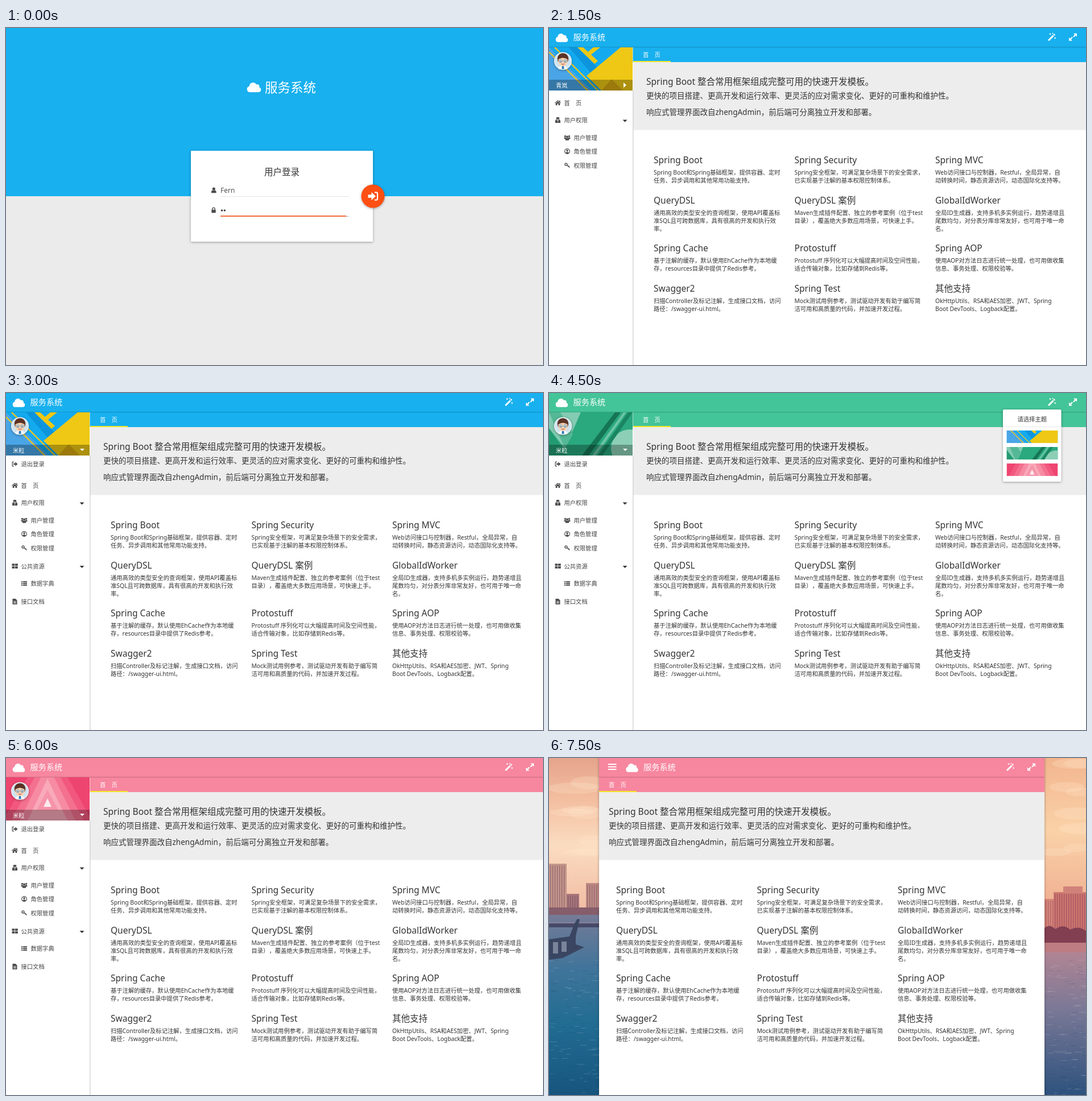
These frames come from a looping animation (944x593 px, 8 s). An HTML page:

```html
<!DOCTYPE html>
<html lang="zh-CN">
<head>
<meta charset="utf-8">
<title>服务系统</title>
<style>
html, body { margin: 0; width: 100%; height: 100%; overflow: hidden; background: #fff; }
#stage { display: block; width: 100%; height: 100%; }
text { font-family: "Noto Sans", "Noto Sans CJK SC", "Noto Sans CJK", sans-serif; text-spacing-trim: space-all; }
.shadow { filter: drop-shadow(0 1px 2px rgba(0,0,0,.35)); }
</style>
</head>
<body>
<svg id="stage" viewBox="0 0 944 593"></svg>
<script>
const stage = document.getElementById('stage');

const rect = (x, y, w, h, fill, more = '') =>
  `<rect x="${x}" y="${y}" width="${w}" height="${h}" fill="${fill}" ${more}/>`;
const circle = (x, y, r, fill, more = '') => `<circle cx="${x}" cy="${y}" r="${r}" fill="${fill}" ${more}/>`;
const path = (d, fill, more = '') => `<path d="${d}" fill="${fill}" ${more}/>`;
const stroke = (d, color, width) => path(d, 'none', `stroke="${color}" stroke-width="${width}"`);
const text = (x, y, size, str, fill = '#333', more = '') =>
  `<text x="${x}" y="${y}" font-size="${size}" fill="${fill}" ${more}>${str}</text>`;
const move = (x, y, body, scale = 1) => `<g transform="translate(${x} ${y}) scale(${scale})">${body}</g>`;

// Icons are centred on 0,0 and about 10px wide, except the cloud (25 x 18, from its corner).
const INK = '#4d4d4d';
const cloud = path('M5.5 18A5.4 5.4 0 0 1 3.7 7.4A6.6 6.6 0 0 1 16 4.3A3.9 3.9 0 0 1 21.2 9.3A4.5 4.5 0 0 1 20 18Z', '#fff');
const icons = {
  home: path('M-5.5 .3L0-4.6L2.6-2.3V-4H4V-1L5.5 .3L4.7 1L0-3L-4.7 1ZM-3.8 1L0-2.2L3.8 1V4.5H1V1.6H-1V4.5H-3.8Z', INK),
  user: circle(0, -2.3, 2.6, INK) + path('M-4.3 4.8V2.6Q-4.3 .2-2 .2H2Q4.3 .2 4.3 2.6V4.8Z', INK),
  lock: rect(-3.7, -.7, 7.4, 5.4, INK, 'rx=".7"') + stroke('M-2.2 0V-2.2A2.2 2.2 0 0 1 2.2-2.2V0', INK, 1.4),
  keeper: path('M-3-1.6L-2.3-5H2.3L3-1.6ZM-4.5 5V1.6Q-4.5-.8-2.5-.8H2.5Q4.5-.8 4.5 1.6V5Z', INK) +
    rect(-1.6, 0, 3.2, 1, '#fff') + rect(-.4, 2, .8, 2, '#fff'),
  group: [-3.5, 3.5].map(x => circle(x, -2.6, 1.7, INK) + rect(x - 2, -.6, 4, 2.8, INK, 'rx="1"')).join('') +
    circle(0, -1.5, 2.3, INK, 'stroke="#fff" stroke-width=".5"') + rect(-3.2, .8, 6.4, 4, INK, 'rx="1.4"'),
  face: circle(0, 0, 4.4, 'none', `stroke="${INK}" stroke-width="1.2"`) + circle(0, -1.2, 1.7, INK) +
    path('M-3.2 2.8Q0-.6 3.2 2.8Q0 5.6-3.2 2.8Z', INK),
  key: circle(-2, -1.6, 2, 'none', `stroke="${INK}" stroke-width="1.4"`) + stroke('M-.5-.3L4.4 4M2.3 2.2L3.4 .9', INK, 1.5),
  exit: stroke('M-1.5-3.6H-4.3V3.6H-1.5', INK, 1.2) + path('M-2.5-1.3H.7V-3.8L5 0L.7 3.8V1.3H-2.5Z', INK),
  grid: [[-5, -4.2], [.5, -4.2], [-5, .5], [.5, .5]].map(([x, y]) => rect(x, y, 4.8, 3.8, INK)).join(''),
  list: [-3.8, -.9, 2].map(y => rect(-5, y, 2, 2, INK) + rect(-2.2, y, 7.2, 2, INK)).join(''),
  doc: path('M-4-5H1.2L4-2.2V5H-4Z', INK) + stroke('M-2.2-.2H2.2M-2.2 1.4H2.2M-2.2 3H2.2', '#fff', .8),
};
const downCaret = (x, y, fill) => path(`M${x - 4} ${y - 2}h8l-4 4Z`, fill);
const wand = stroke('M-6 6L2.6-2.6', '#fff', 3) + stroke('M3.4-3.4L5-5', '#fff', 3) +
  stroke('M-3-7v3M-4.5-5.5h3M1.5-7.4v2M.5-6.4h2M5.6 .2v3M4.1 1.7h3', '#fff', 1);
const expand = path('M1-6.5H7V-.5L4.8-2.7L1.7 .4L.2-1.1L3.2-4.2ZM-1 6.5H-7V.5L-4.8 2.7L-1.7-.4L-.2 1.1L-3.2 4.2Z', '#fff');

const themes = {
  blue: {
    color: '#18b0ee',
    art: rect(0, 34, 147, 76, '#14aaf0') +
      path('M0 34L75 110H0Z', '#4aa5e6') + path('M35 34H50L100 84L88 96Z', '#0c95dc') +
      path('M126 34H147V110H92L66 84Z', '#eec814') + path('M92 110L110 90L130 110Z', '#d6a80e') +
      stroke('M0 42L70 112M8 32L88 112', '#e8c528', 2.4) +
      path('M50 34H60L86 58L80 63ZM78 34H90L70 50L65 45Z', '#eec814'),
  },
  green: {
    color: '#44c499',
    art: rect(0, 34, 147, 76, '#2aa87e') +
      path('M0 34H56L28 98L0 62Z', '#83cbb2') + path('M0 34H20L42 72L28 98Z', '#54b896') +
      path('M0 62L32 110H0Z', '#239b72') +
      circle(142, 97, 33, '#8ccfb6') +
      path('M116 34H126L70 110H58Z', '#157555') + path('M131 34H136L82 110H76Z', '#6cc5a6') +
      path('M139 34H147L94 110H86Z', '#1a8562'),
  },
  pink: {
    color: '#f7869f',
    art: rect(0, 34, 147, 76, '#ee4570') +
      [[78, '#f2587f', -28], [64, '#f4708f', -8], [49, '#f68ba3', 10], [35, '#f9a9b9', 36]].map(([half, fill, top]) =>
        path(`M73 ${top}L${73 + half} 110H${73 - half}Z`, fill)).join('') +
      path('M73 56L92 92H54Z', '#f694aa') + path('M73 71L80 86H66Z', '#fdeaee'),
  },
};
const banner = (name, x, y, w, h) => `<svg x="${x}" y="${y}" width="${w}" height="${h}"
  viewBox="0 34 147 76" preserveAspectRatio="xMidYMid slice">${themes[name].art}</svg>`;

const avatar = circle(0, 0, 15.5, '#f3f6f8') + circle(0, 0, 14.3, '#cfe3ef') +
  path('M-8 14Q-7 8 0 8Q7 8 8 14Q0 16-8 14Z', '#f4f7fa') + path('M-1.5 8H1.5L2 14H-2Z', '#2878b8') +
  circle(0, -4, 9.8, '#5b3326') + path('M-8-3Q0-8 8-3V3Q6 9 0 9Q-6 9-8 3Z', '#fbd3b0') +
  [-3.8, 3.8].map(x => circle(x, .2, 2.6, '#fff', 'stroke="#5a87a0" stroke-width="1"') + circle(x, .4, 1, '#333')).join('') +
  stroke('M-2.5 5Q0 7 2.5 5', '#b5443c', 1.2);

const features = [
  ['Spring Boot', 'Spring Boot和Spring基础框架，提供容器、定时', '任务、异步调用和其他常用功能支持。'],
  ['Spring Security', 'Spring安全框架，可满足复杂场景下的安全需求，', '已实现基于注解的基本权限控制体系。'],
  ['Spring MVC', 'Web访问接口与控制器，Restful，全局异常，自', '动转换时间，静态资源访问，动态国际化支持等。'],
  ['QueryDSL', '通用高效的类型安全的查询框架，使用API覆盖标', '准SQL且可跨数据库，具有很高的开发和执行效', '率。'],
  ['QueryDSL 案例', 'Maven生成插件配置、独立的参考案例（位于test', '目录），覆盖绝大多数应用场景，可快速上手。'],
  ['GlobalIdWorker', '全局ID生成器，支持多机多实例运行，趋势递增且', '尾数均匀，对分表分库非常友好，也可用于唯一命', '名。'],
  ['Spring Cache', '基于注解的缓存，默认使用EhCache作为本地缓', '存，resources目录中提供了Redis参考。'],
  ['Protostuff', 'Protostuff 序列化可以大幅提高时间及空间性能，', '适合传输对象，比如存储到Redis等。'],
  ['Spring AOP', '使用AOP对方法日志进行统一处理，也可用做收集', '信息、事务处理、权限校验等。'],
  ['Swagger2', '扫描Controller及标记注解，生成接口文档，访问', '路径：/swagger-ui.html。'],
  ['Spring Test', 'Mock测试用例参考，测试驱动开发有助于编写简', '洁可用和高质量的代码，并加速开发过程。'],
  ['其他支持', 'OkHttpUtils、RSA和AES加密、JWT、Spring', 'Boot DevTools、Logback配置。'],
];
const rowBaselines = [238, 308.5, 393, 463.5];

const content = text(171, 100, 15.5, 'Spring Boot 整合常用框架组成完整可用的快速开发模板。') +
  text(171, 124, 13.5, '更快的项目搭建、更高开发和运行效率、更灵活的应对需求变化、更好的可重构和维护性。') +
  text(171, 152.5, 13.5, '响应式管理界面改自zhengAdmin，前后端可分离独立开发和部署。') +
  features.map(([title, ...lines], i) => {
    const x = 184 + (i % 3) * 247.5, y = rowBaselines[Math.floor(i / 3)];
    return text(x, y, 15.5, title) +
      lines.map((line, n) => text(x, y + 20 + n * 14.3, 10.3, line)).join('');
  }).join('');

// [icon, label, centre y, nested, expandable]
const userMenu = [
  ['home', '首　页', 131.5], ['keeper', '用户权限', 162, 0, 1],
  ['group', '用户管理', 193, 1], ['face', '角色管理', 217, 1], ['key', '权限管理', 241.5, 1],
];
const fullMenu = [
  ['exit', '退出登录', 125], ...userMenu.map(([icon, label, y, ...rest]) => [icon, label, y + 31, ...rest]),
  ['grid', '公共资源', 304.5, 0, 1], ['list', '数据字典', 335, 1], ['doc', '接口文档', 367],
];
const menuItem = ([icon, label, y, nested, expandable]) =>
  move(nested ? 32 : 15.5, y, icons[icon]) + text(nested ? 43.5 : 26.5, y + 4, 10.3, label, '#444') +
  (expandable ? downCaret(133.5, y + 1.5, '#333') : '');

function sidebar(theme, user, opened) {
  return rect(0, 34, 147.5, 559, '#fff') + rect(147, 110, 1.5, 483, '#d6d6d6') +
    banner(theme, 0, 34, 147, 76) + rect(0, 91, 147, 19, 'rgba(0,0,0,.28)') +
    `<g class="shadow">${move(24.5, 58, avatar)}</g>` + text(12, 104.5, 10.3, user, '#fff') +
    (opened ? downCaret(134, 100, '#fff') : path('M131 96L136 100.5L131 105Z', '#fff')) +
    (opened ? fullMenu : userMenu).map(menuItem).join('');
}

function page(theme, left, right, shifts) {
  const { color } = themes[theme];
  return rect(left, 0, right - left, 593, '#fff') + rect(left, 0, right - left, 60, color) +
    rect(left, 33, right - left, 1, 'rgba(0,0,0,.16)') + rect(left, 34, right - left, 1, 'rgba(0,0,0,.05)') +
    move(12 + shifts.title, 9, cloud, .88) + text(42.5 + shifts.title, 21, 14.2, '服务系统', '#fff') +
    move(884 + shifts.tools, 16, wand) + move(921 + shifts.tools, 16, expand) +
    text(165 + shifts.tab, 51, 10.3, '首　页', '#fff') + rect(148 + shifts.tab, 58, 66, 2, '#f3e722') +
    rect(148 + shifts.tab, 60, right - 148 - shifts.tab, 119.5, '#ededed') + move(shifts.content, 0, content);
}

const dashboard = (theme, user, opened) =>
  page(theme, 0, 944, { title: 0, tools: 0, tab: 0, content: 0 }) + sidebar(theme, user, opened);

const themePicker = rect(798, 29, 102.5, 127, '#fff', 'rx="2" class="shadow"') +
  text(823.5, 49.5, 10.3, '请选择主题') + rect(798, 59, 102.5, 1, '#e8e8e8') +
  Object.keys(themes).map((name, i) => banner(name, 804.5, 66 + i * 29, 90, 22)).join('');

const login = rect(0, 0, 944, 296, '#18b0ee') + rect(0, 296, 944, 297, '#ebebeb') +
  move(424, 95, cloud) + text(455, 113, 22.5, '服务系统', '#fff') +
  rect(325, 216, 320, 160, '#fff', 'rx="1" class="shadow"') +
  text(485, 259, 15.5, '用户登录', '#333', 'text-anchor="middle"') +
  move(365.3, 285.5, icons.user) + move(365, 320.5, icons.lock) +
  text(377, 289.5, 12, 'Fern', '#555') + rect(377, 296, 226, 1, '#e4e4e4') +
  circle(379.5, 321, 1.8, '#444') + circle(384.3, 321, 1.8, '#444') +
  rect(377, 331, 226, 1, '#bbb') + rect(377, 330, 221, 2, '#f26a3d') +
  circle(645, 296, 20.5, '#ff4f12', 'class="shadow"') +
  move(645.5, 296, path('M-9-2.7H-3V-7.2L4.5 0L-3 7.2V2.7H-9Z', '#fff') +
    stroke('M2.5-6.6H5.5Q7.5-6.6 7.5-4.6V4.6Q7.5 6.6 5.5 6.6H2.5', '#fff', 2.2));

const gradient = (id, stops) => `<linearGradient id="${id}" x2="0" y2="1">` +
  stops.map(([at, color]) => `<stop offset="${at}" stop-color="${color}"/>`).join('') + '</linearGradient>';

function harbour() {
  let seed = 7;
  const random = () => (seed = seed * 16807 % 2147483647) / 2147483647;
  const windows = (x, y, w, h, fill) => Array.from({ length: Math.floor(w / 4) }, (_, i) =>
    rect(x + 2 + i * 4, y + 3, 1.3, h - 3, fill)).join('');
  const building = (x, y, w, h, fill, shade) => rect(x, y, w, h, fill) + windows(x, y, w, h, shade);
  const cloudBand = (x, y) => `<ellipse cx="${x}" cy="${y}" rx="${20 + random() * 30}" ry="${5 + random() * 9}"
    fill="#ffe5cb" opacity=".25"/>`;
  const ripple = () => {
    const x = random() < .5 ? random() * 88 : 865 + random() * 79, y = 355 + random() * 238;
    return rect(x, y, 4 + random() * 10, 1, random() < .5 ? '#fff' : '#123a63', 'opacity=".16"');
  };
  return gradient('skyL', [[0, '#e5a48c'], [.25, '#f3bd9f'], [.55, '#fbdcc0'], [1, '#f0b9a0']]) +
    gradient('skyR', [[0, '#f2b58e'], [.4, '#fad2a8'], [1, '#eba088']]) +
    gradient('seaL', [[0, '#757b97'], [.3, '#40749a'], [.6, '#226c92'], [1, '#17557e']]) +
    gradient('seaR', [[0, '#b08594'], [.4, '#7a7896'], [1, '#2d527d']]) +
    rect(0, 0, 88, 280, 'url(#skyL)') + rect(871, 0, 73, 320, 'url(#skyR)') +
    Array.from({ length: 16 }, (_, i) => cloudBand(i % 2 ? 20 + random() * 60 : 890 + random() * 50, random() * 180)).join('') +
    building(0, 186, 31, 90, '#c5968a', '#946970') + building(31, 239, 22, 37, '#a9767a', '#80596a') +
    building(65, 220, 23, 56, '#bf8b84', '#946970') + rect(0, 263, 88, 14, '#865d6b') +
    rect(0, 276, 88, 317, 'url(#seaL)') + rect(0, 289, 88, 9, '#454a68') + rect(0, 289, 88, 2, '#8a809a') +
    path('M0 319L36 314L45 291L50 283L54 284L47 313V328L62 333L24 352L0 355Z', '#3a4561') +
    rect(7, 324, 9, 20, '#79839a') + rect(22, 323, 9, 18, '#79839a') +
    building(871, 248, 16, 60, '#d58678', '#b4646c') + building(887, 236, 57, 72, '#cb7770', '#a9535f') +
    rect(904, 226, 34, 12, '#d0827a') +
    path('M871 299Q880 291 890 301Q905 291 916 302Q930 294 944 304V328H871Z', '#823f52') +
    rect(871, 325, 73, 20, '#bd7d82') + rect(871, 342, 73, 251, 'url(#seaR)') +
    Array.from({ length: 240 }, ripple).join('');
}

const collapsed = harbour() +
  rect(88, -5, 783, 603, '#fff', 'class="shadow"') +
  page('pink', 88, 871, { title: 123.5, tools: -73, tab: -60, content: -66 }) +
  stroke('M104 11H118.5M104 15.5H118.5M104 20H118.5', '#fff', 2);

const scenes = [
  login,
  dashboard('blue', '青岚', false),
  dashboard('blue', '米粒', true),
  dashboard('green', '米粒', true) + themePicker,
  dashboard('pink', '米粒', true),
  collapsed,
];

let shown = -1;
function draw() {
  const scene = Math.floor(performance.now() % 8000 / 1500);
  if (scene !== shown) stage.innerHTML = scenes[shown = scene];
  requestAnimationFrame(draw);
}
draw();
</script>
</body>
</html>
```
